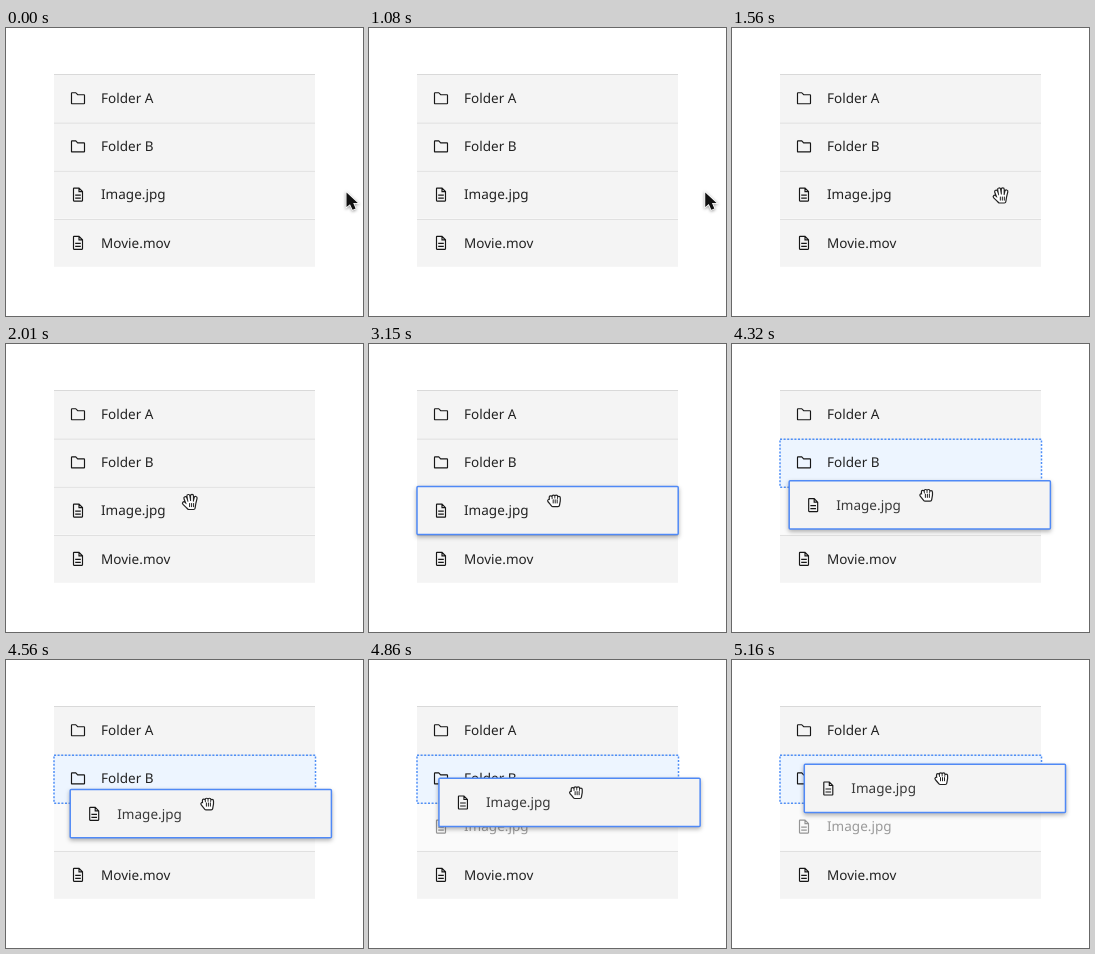
These frames come from a looping animation (357x288 px, 7.17 s). An HTML page:

```html
<!DOCTYPE html>
<html lang="en">
<head>
<meta charset="utf-8">
<title>Drag and drop file list</title>
<style>
  html, body { margin: 0; width: 100%; height: 100%; overflow: hidden; background: #fff; }
  svg { display: block; width: 100%; height: 100%; }
  text { font: 13.5px "Noto Sans", sans-serif; letter-spacing: .03px; fill: #222; text-rendering: geometricPrecision; }
  .icon { fill: none; stroke: #161616; stroke-width: 1.15; }
  #card { filter: drop-shadow(0 2px 2px rgba(0, 0, 0, .3)); }
  #card.moving text { fill: #393939; }
  #arrow { filter: drop-shadow(0 1.5px 1.5px rgba(0, 0, 0, .4)); }
  .hand { stroke-linecap: round; stroke-linejoin: round; fill: #fff; }
</style>
</head>
<body>
<svg viewBox="0 0 357 288">
  <defs>
    <path id="folder" class="icon" d="M1.5 3q0-.5.5-.5h3.7l2 2H14q.5 0 .5.5v8q0 .5-.5.5H2q-.5 0-.5-.5z"/>
    <path id="file" class="icon" d="M9 1.5H4q-.5 0-.5.5v12q0 .5.5.5h8q.5 0 .5-.5V5zV5h3.5M5.2 8.5h5.6M5.2 11.5h5.6"/>
    <path id="openShape" d="M6.4 10.5L4.4 5.2M8.4 9L7.4 3M11 9V2.9M13.4 10L14.6 5M6.4 13.5L3 10.3M6.4 10.5L8.4 9H11L13.4 10 12.6 15H7.8L6.4 13.5z"/>
    <path id="closedShape" d="M6.9 7.6L6.7 4.4M9.5 6.5V3.6M12.2 6.5V3.6M14.8 7.6V4.8M7 10L5.2 7.8M6.9 7.6L9.5 6.5H12.2L14.8 7.6 14 12.2H8.8L7 10z"/>
  </defs>

  <g id="list"></g>
  <rect x="48" y="95.2" width="261.5" height="48" id="outline" fill="none" stroke="#4f8ff7" stroke-width="1.5" stroke-dasharray="2 1.6"/>
  <g id="card">
    <rect x="48" y="142.4" width="261.2" height="48.2" rx="1" fill="#f4f4f4" stroke="#4f89f6" stroke-width="1.5"/>
    <use href="#file" x="64" y="158.7"/>
    <text x="95" y="171.4">Image.jpg</text>
  </g>

  <path id="arrow" d="M.5 1.5V16L4 13.2l2.6 5.6 3-1.3L7.2 12H11.8z" fill="#111" stroke="#fff" stroke-width="1.6" paint-order="stroke"/>
  <g id="open" class="hand">
    <use href="#openShape" stroke="#222" stroke-width="4.2"/>
    <use href="#openShape" stroke="#fff" stroke-width="1.8"/>
    <path d="M8.6 10.5v3.2M10.6 10.5v3.2M12.6 10.5v3.2" stroke="#222"/>
  </g>
  <g id="closed" class="hand">
    <use href="#closedShape" stroke="#222" stroke-width="4.2"/>
    <use href="#closedShape" stroke="#fff" stroke-width="1.8"/>
    <path d="M9.2 6.8v3.2M11.2 6.8v3.2M13.2 6.8v3.2" stroke="#222"/>
  </g>
</svg>
<script>
const LOOP = 7170, STEP = 30;
const GRAB = 3150, DRAG = 4080;
const LIST_TOP = 46, LIST_RIGHT = 309, ROW = 48.2;
const byId = id => document.getElementById(id);

const rows = [["folder", "Folder A"], ["folder", "Folder B"], ["file", "Image.jpg"], ["file", "Movie.mov"]];
byId("list").innerHTML = rows.map(([icon, label], i) => {
  const y = LIST_TOP + ROW * i;
  return `<g><rect x="48" y="${y}" width="261" height="${ROW}" fill="#f4f4f4"/>
    <rect x="48" y="${i ? y + .4 : y}" width="261" height="1" fill="${i ? "#e0e0e0" : "#d9d9d9"}"/>
    <use href="#${icon}" x="64" y="${y + 16.2}"/>
    <text x="95" y="${y + 29}">${label}</text></g>`;
}).join("");
const [, target, dragged] = byId("list").children;

const clamp = v => Math.min(1, Math.max(0, v));
// Quadratic curve from 0 to 1 with one control value
const curve = (t, control) => 2 * t * (1 - t) * control + t * t;
const show = (el, on) => el.style.display = on ? "" : "none";
const move = (el, x, y) => el.setAttribute("transform", `translate(${x} ${y})`);

function draw(time) {
  const approach = clamp((time - 1050) / 960);
  const drag = clamp((time - DRAG) / 1080);
  const grabbed = time >= GRAB, dragging = drag > 0;

  const dx = 24.3 * curve(drag, .95), dy = -38.2 * curve(drag, .28);
  const x = 340 - 165 * curve(approach, .41) + dx;
  const y = 163 - 14 * curve(approach, .08) + dy;
  const overList = x < LIST_RIGHT;

  show(byId("arrow"), !overList);
  show(byId("open"), overList && !grabbed);
  show(byId("closed"), grabbed);
  for (const id of ["arrow", "open", "closed"]) move(byId(id), x, y);

  show(byId("card"), grabbed);
  byId("card").classList.toggle("moving", dragging);
  move(byId("card"), dx, dy);

  show(byId("outline"), dragging);
  target.firstChild.setAttribute("fill", dragging ? "#edf5ff" : "#f4f4f4");
  dragged.setAttribute("opacity", dragging ? .45 : 1);
}

const start = performance.now();
function tick() {
  const time = (performance.now() - start) % LOOP;
  draw(Math.floor(time / STEP) * STEP);
  requestAnimationFrame(tick);
}
tick();
</script>
</body>
</html>
```
